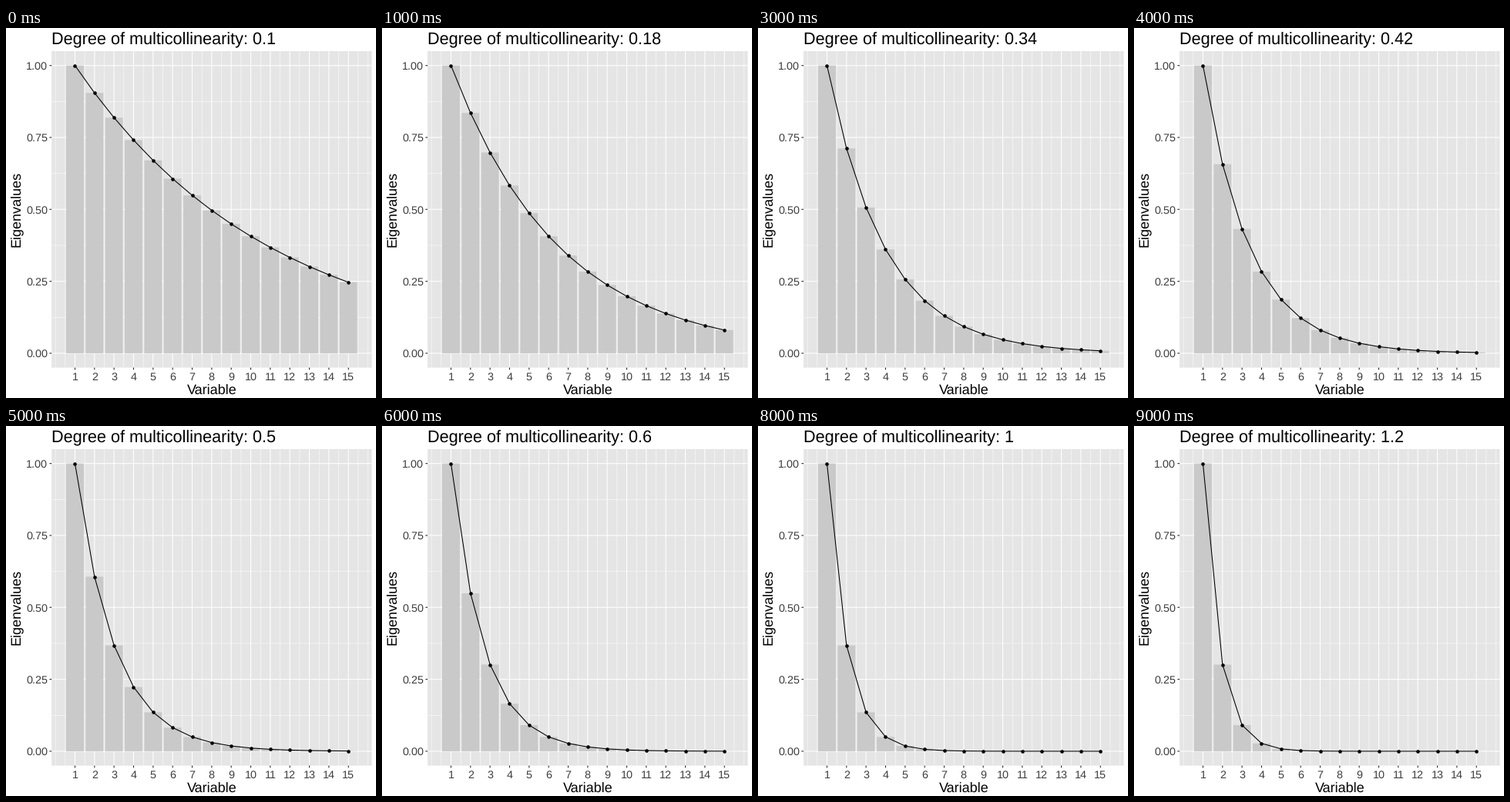
Recreate the animation shown at these times as a matplotlib script. Size 480 px wide and 480 px high, loop 10000 ms.

```python
import numpy as np
import matplotlib.pyplot as plt
from matplotlib.animation import FuncAnimation
from matplotlib.patches import Rectangle

plt.rcParams["font.family"] = "Liberation Sans"
plt.rcParams["text.hinting"] = "none"
plt.rcParams["toolbar"] = "None"

SIZE, DPI = 480, 96
PT = 72 / DPI  # points per pixel
LEFT, RIGHT, TOP, BOTTOM = 59.2, 474.5, 30.0, 440.6
PANEL, BAR, LABEL, TICK = "#e5e5e5", "#c9c9c9", "#3e3e3e", "#262626"

degrees = np.concatenate([np.linspace(0.1, 0.5, 6), [0.6, 0.8, 1.0, 1.2]])
variables = np.arange(1, 16)


def px(v):
    return LEFT + (v + 0.195) / 16.39 * (RIGHT - LEFT)


def py(v):
    return BOTTOM - (v + 0.05) / 1.1 * (BOTTOM - TOP)


fig = plt.figure(figsize=(SIZE / DPI, SIZE / DPI), dpi=DPI, facecolor="white")
ax = fig.add_axes([0, 0, 1, 1])
ax.set_xlim(0, SIZE)
ax.set_ylim(SIZE, 0)
ax.axis("off")


def line(xs, ys, color, width, z):
    return ax.plot(xs, ys, color=color, lw=width * PT, zorder=z, snap=False,
                   solid_capstyle="butt", solid_joinstyle="round")[0]


def label(x, y, text, size, color="black", **kw):
    return ax.text(x, y, text, fontsize=size * PT, color=color, **kw)


def vgrid(v, width, z):
    line([px(v)] * 2, [TOP, BOTTOM], "white", width, z)


def hgrid(v, width, z):
    line([LEFT, RIGHT], [py(v)] * 2, "white", width, z)


ax.add_patch(Rectangle((LEFT, TOP), RIGHT - LEFT, BOTTOM - TOP, fc=PANEL,
                       lw=0, zorder=0, snap=False))

for v in [0, *(np.arange(16) + 0.5), 16]:
    vgrid(v, 0.53, 1)
for v in np.arange(0.125, 1, 0.25):
    hgrid(v, 0.53, 1)

for v in variables:
    vgrid(v, 1.07, 2)
    line([px(v)] * 2, [BOTTOM, BOTTOM + 2.75], TICK, 1.07, 2)
    label(px(v), 457, str(v), 14.4, LABEL, ha="center", va="baseline")
for v in np.linspace(0, 1, 5):
    hgrid(v, 1.07, 2)
    line([LEFT - 2.75, LEFT], [py(v)] * 2, TICK, 1.07, 2)
    label(54.2, py(v) + 5.2, f"{v:.2f}", 14.4, LABEL, ha="right", va="baseline")

label((LEFT + RIGHT) / 2, 475, "Variable", 18, ha="center", va="baseline")
label(18.2, (TOP + BOTTOM) / 2, "Eigenvalues", 18, ha="center", va="baseline",
      rotation=90, rotation_mode="anchor")
title = label(LEFT, 21, "", 21.6, ha="left", va="baseline")

bars = [ax.add_patch(Rectangle((px(v - 0.45), py(0)), px(0.9) - px(0), 0,
                               fc=BAR, lw=0, zorder=3, snap=False))
        for v in variables]
curve = line(px(variables), py(variables * 0.0), "black", 1.07, 4)
dots = ax.plot(px(variables), py(variables * 0.0), "o", color="black",
               ms=4.6 * PT, mew=0, zorder=5, snap=False)[0]


def update(i):
    d = degrees[i]
    eigen = np.exp(-d * (variables - 1))
    title.set_text(f"Degree of multicollinearity: {d:g}")
    for bar, e in zip(bars, eigen):
        bar.set_height(py(e) - py(0))
    curve.set_ydata(py(eigen))
    dots.set_ydata(py(eigen))
    return [title, curve, dots, *bars]


anim = FuncAnimation(fig, update, frames=len(degrees), interval=1000,
                     repeat=True, repeat_delay=0, blit=False)
plt.show()
```
